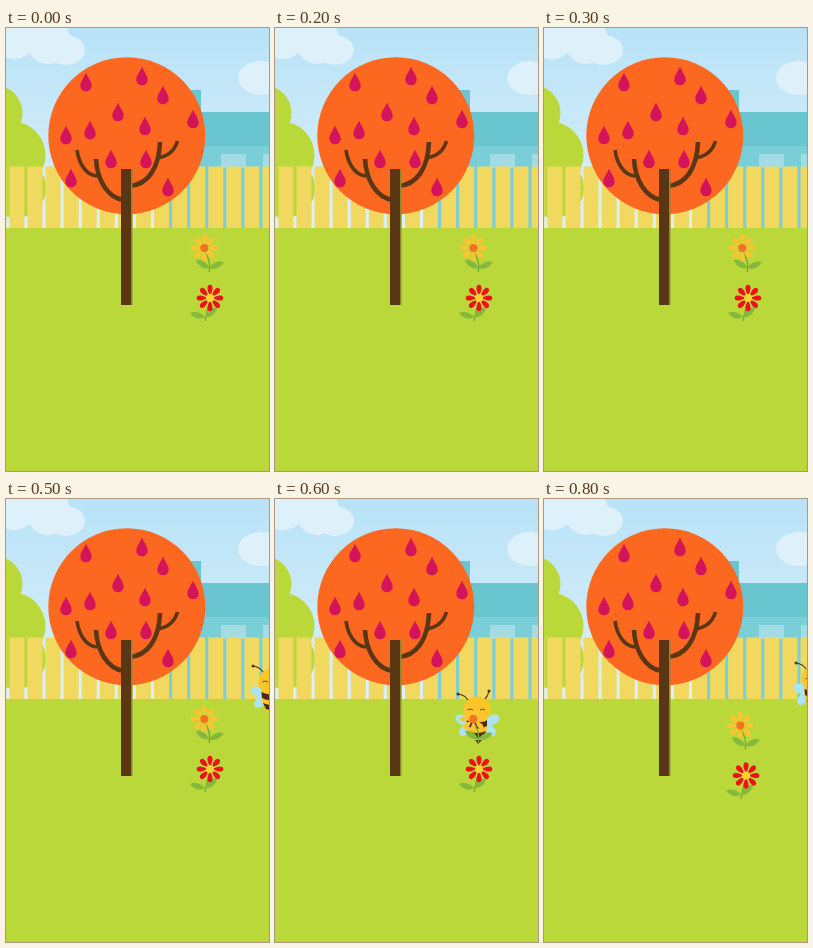
Animation of 263 by 443 pixels, one loop 900 ms. Source, as an HTML page:

```html
<!DOCTYPE html>
<html lang="en">
<head>
<meta charset="utf-8">
<title>Bee in the garden</title>
<style>
  html, body { margin: 0; width: 100%; height: 100%; overflow: hidden; }
  svg { display: block; width: 100%; height: 100%; }
</style>
</head>
<body>
<svg viewBox="0 0 263 443" preserveAspectRatio="none">
  <defs>
    <linearGradient id="sky" x2="0" y2="1">
      <stop offset="0" stop-color="#b8e2f8"/>
      <stop offset="1" stop-color="#dcf1f8"/>
    </linearGradient>
    <path id="drop" d="M0-9.5C2-4 5.7-1 5.7 4A5.7 5.3 0 0 1-5.7 4C-5.7-1-2-4 0-9.5Z"/>
    <path id="petal" d="M0-3C-3-7-3.8-13.3 0-13.3S3-7 0-3Z"/>
    <path id="leaf" d="M0 0C-4-7-10-8-14-7C-11-1-6 2 0 0Z"/>
    <g id="wing">
      <ellipse cx="188" cy="221" rx="8" ry="4.8" transform="rotate(25 188 221)"/>
      <ellipse cx="190" cy="231" rx="7" ry="4.5" transform="rotate(-45 190 231)"/>
    </g>
  </defs>

  <rect width="263" height="200" fill="url(#sky)"/>
  <g fill="#def1fa">
    <ellipse cx="8" cy="13" rx="21" ry="18"/>
    <ellipse cx="42" cy="12" rx="22" ry="24"/>
    <ellipse cx="60" cy="22" rx="19" ry="15"/>
    <ellipse cx="255" cy="50" rx="23" ry="17"/>
  </g>
  <g fill="#bbd83a">
    <circle cx="-11.5" cy="85" r="28"/>
    <circle cx="6" cy="127" r="33.5"/>
    <circle cx="10" cy="160" r="30"/>
  </g>
  <path d="M160 118H263V200H160Z" fill="#79ced8"/>
  <path d="M173 118V111H183V62H195V84H263V118Z" fill="#69c5d0"/>
  <path d="M215 126h25v14h-25zM257 126h6v14h-6z" fill="#a3dce5"/>
  <g id="fence" fill="#f1d95f"></g>
  <rect y="200" width="263" height="243" fill="#bbd83a"/>

  <circle cx="120.8" cy="107.8" r="78.5" fill="#fd6820"/>
  <g id="drops" fill="#d4145a"></g>
  <g fill="none" stroke="#5a3714">
    <path d="M118 172C101 170 91 151 90 131M123 158C142 157 153 140 154 114" stroke-width="4.6"/>
    <path d="M91 148C80 147 73 136 71 122M151 130Q167 128 171.5 113" stroke-width="3.6"/>
  </g>
  <rect x="115" y="141" width="10" height="136" fill="#5a3714"/>
  <rect x="125" y="141" width="1.5" height="136" fill="#8d8a2c"/>

  <g id="bee">
    <g fill="#a9e5f6">
      <use href="#wing"/>
      <use href="#wing" transform="translate(405 0) scale(-1 1)"/>
    </g>
    <path d="M192 217C189 232 196 241 203 245C211 240 214 230 211 217Z" fill="#fcc628"/>
    <path d="M191.5 221Q202 226 212 221V227Q202 232 192 227ZM193 232Q202 236 211 232L208 238Q202 240 196 238ZM200 241H207L203 245Z" fill="#4a2c14"/>
    <ellipse cx="202" cy="210.5" rx="13.6" ry="13" fill="#fcc628"/>
    <path d="M193 201Q190 196 183 195M210 200Q213 197 214 192" fill="none" stroke="#553216" stroke-width="1.2"/>
    <circle cx="183" cy="195" r="1.5" fill="#553216"/>
    <circle cx="214" cy="192" r="1.5" fill="#553216"/>
  </g>
  <g id="flowers"></g>
  <path id="eyes" d="M192.5 211Q195 209 198 211M205 211Q207 209 210 211" fill="none" stroke="#76451b"/>
</svg>
<script>
const byId = id => document.getElementById(id);

const pickets = Array.from({ length: 16 }, (_, i) => 3.4 + 18.08 * (i - 1));
byId('fence').innerHTML = pickets.map(x =>
  `<rect x="${x}" y="138.5" width="15" height="62"/>`).join('');

const drops = [[80, 54], [136, 48], [157, 67], [112, 84], [139, 98], [187, 91],
  [60, 107], [84, 102], [105, 131], [140, 131], [65, 150], [162, 159]];
byId('drops').innerHTML = drops.map(([x, y]) =>
  `<use href="#drop" x="${x}" y="${y}"/>`).join('');

function flower(x, y, petals, heart, stemX, stemY, leafTilt) {
  const ring = Array.from({ length: 8 }, (_, i) =>
    `<use href="#petal" fill="${petals}" transform="rotate(${i * 45})"/>`).join('');
  return `<g transform="translate(${x} ${y})">
    <path d="M0 4Q${stemX + 2} 12 ${stemX} ${stemY}" fill="none" stroke="#72a83a" stroke-width="1.3"/>
    <g transform="translate(${stemX} ${stemY - 4}) rotate(${leafTilt})" fill="#84b93d">
      <use href="#leaf"/><use href="#leaf" transform="scale(-1 1)"/>
    </g>
    ${ring}<circle r="4" fill="${heart}"/></g>`;
}
byId('flowers').innerHTML =
  flower(198.3, 220, '#fcc430', '#f47321', 5, 24, 4) +
  flower(204, 270, '#ef1118', '#fbd232', -5, 23, -12);

const STEP = 100, STEPS = 9;
const beeAt = { 5: [64, -28], 6: [0, 0], 7: [-2, 6], 8: [69, -31] };
const move = (id, [x, y]) => byId(id).setAttribute('transform', `translate(${x} ${y})`);

function draw(now) {
  const step = Math.floor(now / STEP) % STEPS;
  const bee = beeAt[step] || [130, -60];
  move('bee', bee);
  move('eyes', bee);
  move('flowers', step > 6 ? [-2, 6.5] : [0, 0]);
  requestAnimationFrame(draw);
}
draw(0);
</script>
</body>
</html>
```
